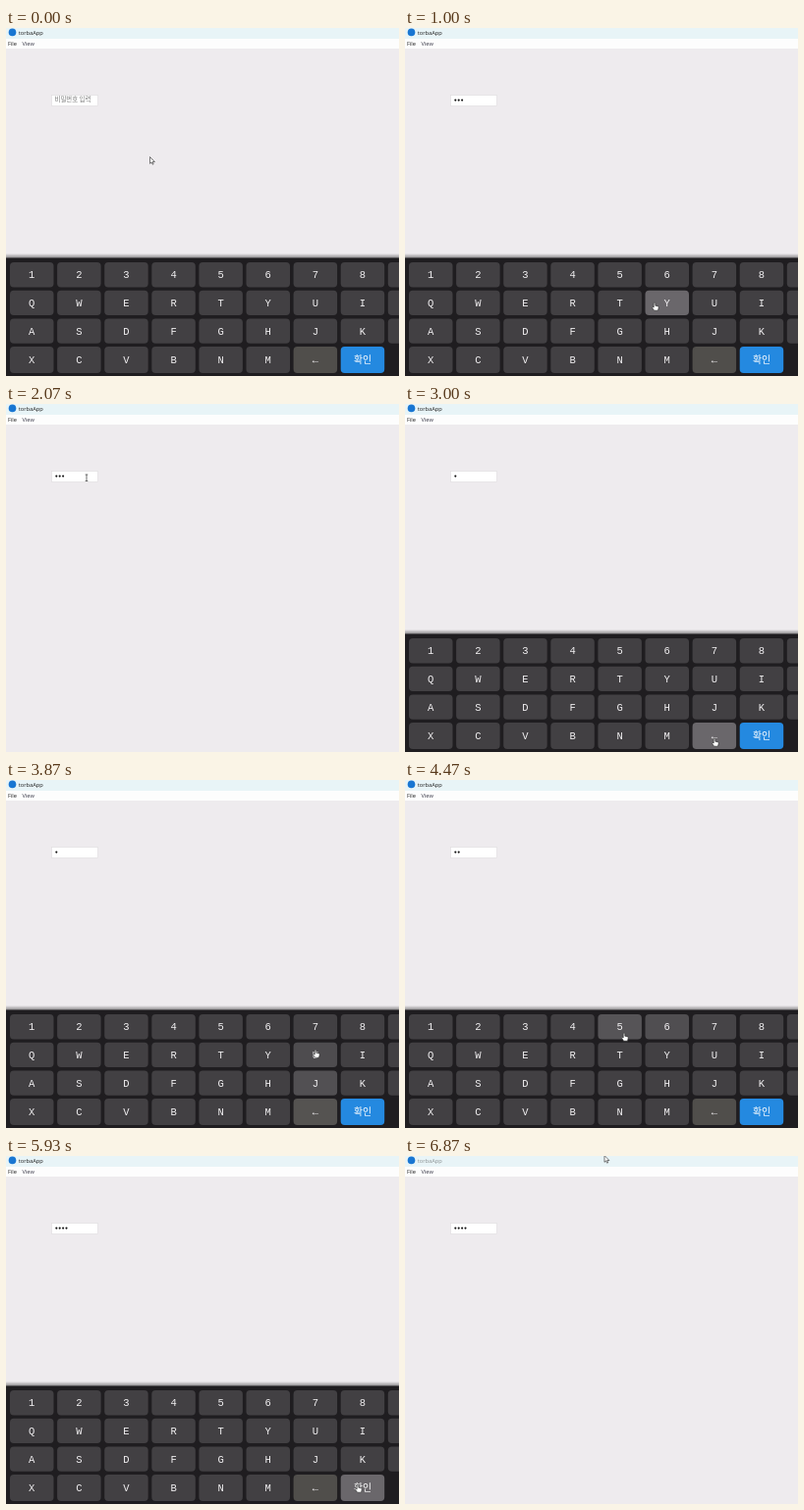
An HTML page that plays this animation: 400 by 355 pixels, repeating every 6940 ms.

```html
<!DOCTYPE html>
<html lang="en">
<head>
<meta charset="utf-8">
<title>Keypad</title>
<style>
  html, body { margin: 0; width: 100%; height: 100%; overflow: hidden; background: #eeebee; }
  svg { display: block; width: 400px; height: 355px; }
  .ui { font: 5.7px "Open Sans", "Noto Sans", sans-serif; }
  .hint { font: 6.4px "Noto Sans CJK KR", "Noto Sans CJK", sans-serif; fill: #777; }
  .key { font: 10.5px "Liberation Mono", monospace; fill: #f2f0f2; text-anchor: middle; }
  .ok { font: 500 9.8px "Noto Sans CJK KR", "Noto Sans CJK", sans-serif; fill: #fff; }
</style>
</head>
<body>
<svg viewBox="0 0 400 355">
  <defs>
    <linearGradient id="shade" x2="0" y2="1">
      <stop stop-color="#000" stop-opacity="0"/>
      <stop offset="1" stop-color="#000" stop-opacity=".45"/>
    </linearGradient>
  </defs>
  <rect width="400" height="355" fill="#eeebee"/>
  <rect width="400" height="11" fill="#e8f4f7"/>
  <rect y="11" width="400" height="10" fill="#fdfdfd"/>
  <circle cx="6.5" cy="4.4" r="3.8" fill="#1976d2"/>
  <text id="title" class="ui" x="12.8" y="6.6">torbaApp</text>
  <text class="ui" x="2" y="18.2" fill="#222">File</text>
  <text class="ui" x="16.5" y="18.2" fill="#3d3d4c">View</text>

  <rect x="46.5" y="68.5" width="47" height="11" fill="#fff" stroke="#e2dfe1" stroke-width=".7"/>
  <text id="hint" class="hint" x="49.6" y="75.4">비밀번호 입력</text>
  <g id="dots" fill="#111"></g>

  <g id="pad">
    <rect y="230" width="400" height="5" fill="url(#shade)"/>
    <rect y="234.5" width="400" height="121" fill="#1f1d20"/>
  </g>

  <g id="cursor">
    <path id="arrow" d="M0 0V6.8L1.6 5.4L2.7 7.7L3.7 7.2L2.7 5H4.9Z"
      fill="#fff" stroke="#222" stroke-width=".6" stroke-linejoin="round"/>
    <path id="hand" d="M-.8 .6Q0 -.5 .8 .6V3.2L3.6 3.9Q4.4 4.2 4.2 5.2L3.5 8.2H-.4L-2.6 5.1Q-2.5 3.9 -.8 5Z"
      fill="#fff" stroke="#222" stroke-width=".6" stroke-linejoin="round"/>
    <path id="beam" d="M-1.3 -3H1.3M0 -3V3.5M-1.3 3.5H1.3" fill="none" stroke="#333" stroke-width=".7"/>
  </g>
</svg>
<script>
const LOOP = 6940, STEP = 200 / 3, STEPS = 104, FADE = 200;
const HOVER = [106, 103, 107];
const $ = id => document.getElementById(id);

function add(parent, tag, attrs, text) {
  const el = document.createElementNS('http://www.w3.org/2000/svg', tag);
  for (const name in attrs) el.setAttribute(name, attrs[name]);
  if (text) el.textContent = text;
  parent.appendChild(el);
  return el;
}

function makeKey(label, col, row) {
  const x = 4 + 48.1 * col, y = 239 + 28.7 * row;
  const w = 44.5, h = row === 3 ? 27 : 25.4;
  const ok = label === '확인';
  const base = ok ? [36, 137, 224] : label === '←' ? [80, 78, 75] : [66, 64, 67];
  const rect = add($('pad'), 'rect', { x, y, width: w, height: h, rx: 4 });
  add($('pad'), 'text', {
    class: ok ? 'key ok' : 'key', x: x + w / 2, y: y + h / 2 + 3.5
  }, label);
  return { x, y, w, h, base, rect };
}

const rows = ['123456789', 'QWERTYUIO', 'ASDFGHJKL', 'XCVBNM←'].map(r => [...r]);
rows[3].push('확인');
const keys = rows.flatMap((row, j) => row.map((label, i) => makeKey(label, i, j)));
const dots = [0, 1, 2, 3].map(i => add($('dots'), 'circle', { cx: 51.3 + 3.4 * i, cy: 73.6, r: 1.05 }));

// Pointer stops: time, x, y
const path = [
  [0, 146.5, 131.5], [70, 146.5, 131.5], [400, 360, 252], [470, 360, 252],
  [640, 316, 281], [710, 316, 281], [830, 254, 280], [1040, 254, 280],
  [1330, 359, 335], [1530, 359, 335], [2000, 82, 75], [2200, 82, 75],
  [2680, 315, 341], [3600, 315, 341], [4000, 315, 252], [4230, 315, 252],
  [4430, 223, 258], [4670, 223, 258], [5000, 361, 254], [5200, 361, 254],
  [5600, 358, 335], [6000, 358, 335], [6730, 203, -.5]
];
// Typed length from each time on
const typed = [[0, 0], [430, 1], [700, 2], [900, 3], [2780, 2], [2920, 1], [4130, 2], [4600, 3], [5130, 4]];
const padState = [[0, 1], [1530, 0], [2190, 1], [5990, 0]];

const valueAt = (list, t) => list.filter(([from]) => from <= t).pop()[1];

function pointer(t) {
  const next = path.findIndex(p => p[0] > t);
  if (next < 1) return (next ? path[path.length - 1] : path[0]).slice(1);
  const a = path[next - 1], b = path[next];
  const p = (t - a[0]) / (b[0] - a[0]), s = p * p * (3 - 2 * p);
  return [a[1] + (b[1] - a[1]) * s, a[2] + (b[2] - a[2]) * s];
}

const inside = (k, [x, y]) => x >= k.x && x <= k.x + k.w && y >= k.y && y <= k.y + k.h;
const show = (el, on) => el.setAttribute('visibility', on ? 'visible' : 'hidden');

function draw(t) {
  const here = pointer(t), open = valueAt(padState, t), count = valueAt(typed, t);
  // Averaging the recent pointer positions gives a linear hover fade
  const trail = Array.from({ length: 20 }, (_, i) => pointer(t - i * FADE / 20));
  for (const k of keys) {
    const level = trail.filter(p => inside(k, p)).length / trail.length;
    k.rect.setAttribute('fill', `rgb(${k.base.map((c, i) => Math.round(c + (HOVER[i] - c) * level))})`);
  }
  $('pad').style.display = open ? '' : 'none';
  show($('hint'), !count);
  dots.forEach((d, i) => show(d, i < count));
  $('title').setAttribute('fill', t > 6700 ? '#8b9193' : '#1c1c1c');

  const onKey = open && keys.some(k => inside(k, here));
  const onField = inside({ x: 46, y: 68, w: 48, h: 12 }, here);
  show($('hand'), onKey);
  show($('beam'), onField);
  show($('arrow'), !onKey && !onField);
  $('cursor').setAttribute('transform', `translate(${here})`);
}

const start = performance.now();
function tick() {
  const t = (performance.now() - start) % LOOP;
  draw(Math.min(STEPS - 1, Math.floor(t / STEP)) * STEP);
  requestAnimationFrame(tick);
}
tick();
</script>
</body>
</html>
```
